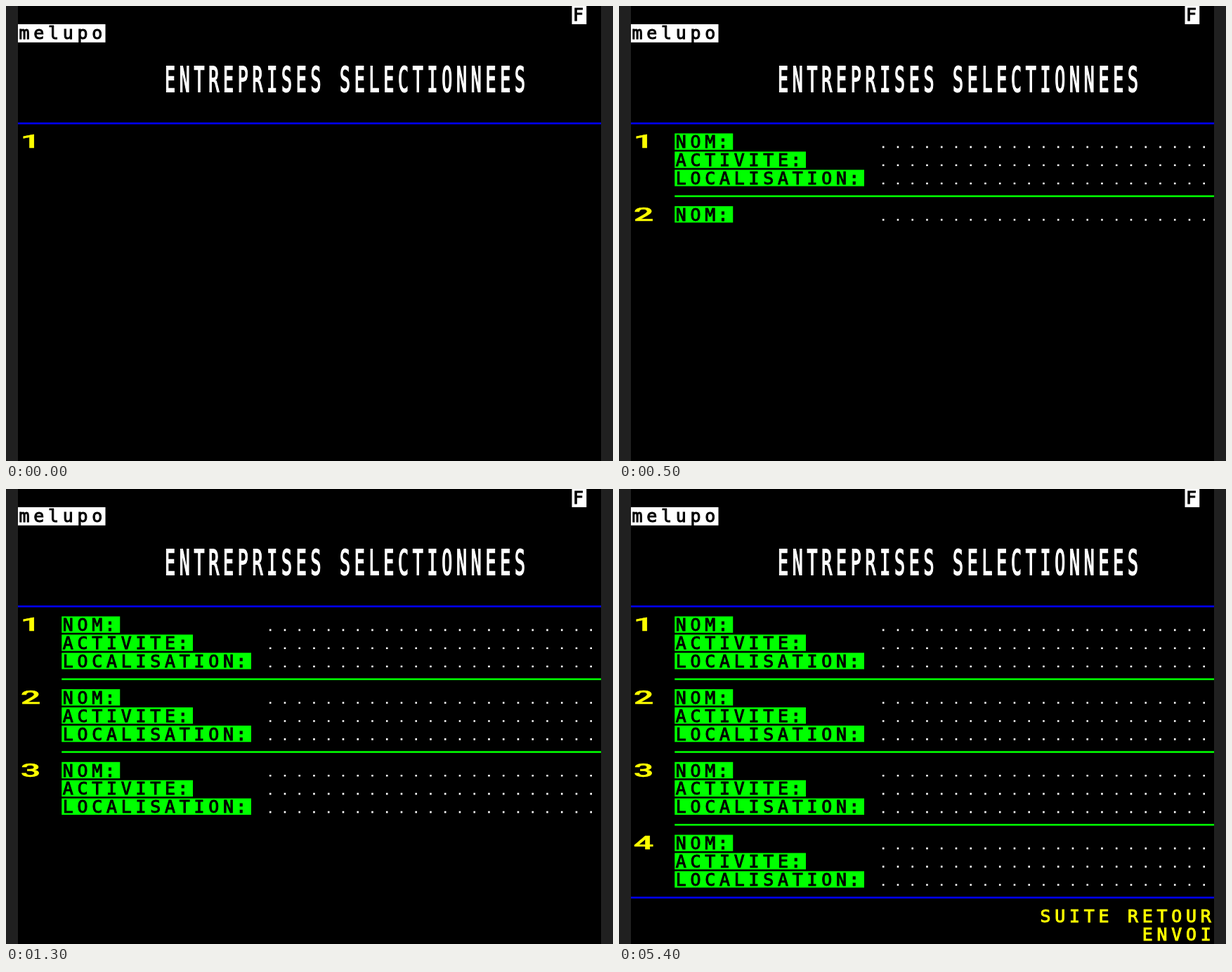
Write an HTML page that moves like this. It is 864 px wide and 648 px high and loops after 8000 ms.

```html
<!DOCTYPE html>
<html lang="fr">
<head>
<meta charset="utf-8">
<title>Entreprises sélectionnées</title>
<style>
  html, body { margin: 0; width: 100%; height: 100%; overflow: hidden; background: #000; }
  svg { display: block; width: 864px; height: 648px; }
  text {
    font: 24.9px "DejaVu Sans Mono", monospace;
    letter-spacing: calc(20.75px - .602em);
    white-space: pre;
    stroke-width: 1;
    stroke-linejoin: miter;
  }
  .digit { font: 500 25.2px Roboto, sans-serif; letter-spacing: 0; text-anchor: middle; stroke-width: .4; }
  .step1 { animation: show1 8s step-end infinite; }
  .step2 { animation: show2 8s step-end infinite; }
  .step3 { animation: show3 8s step-end infinite; }
  @keyframes show1 { 0% { visibility: hidden; } 6.25%, 100% { visibility: visible; } }
  @keyframes show2 { 0% { visibility: hidden; } 12.5%, 100% { visibility: visible; } }
  @keyframes show3 { 0% { visibility: hidden; } 18.75%, 100% { visibility: visible; } }
</style>
</head>
<body>
<svg id="screen" viewBox="0 0 864 648"></svg>
<script>
// Videotex page: 40 x 25 cells, each 8 x 10 dots
const CELL_W = 20.75, CELL_H = 25.92, DOT = 2.592, LEFT = 17, RIGHT = 847;
const YELLOW = '#ff0', GREEN = '#0f0', BLUE = '#00f', WHITE = '#fff', BLACK = '#000';
const colX = col => LEFT + col * CELL_W;
const rowY = row => row * CELL_H;
const textX = col => colX(col) + 1.6;
const baseY = row => rowY(row) + 8 * DOT;

const box = (x, y, w, h, fill) =>
  `<rect x="${x}" y="${y}" width="${w}" height="${h}" fill="${fill}"/>`;

const text = (str, x, y, color, scale = '1 1', kind = 'line') =>
  `<text class="${kind}" transform="translate(${x} ${y}) scale(${scale})"
    fill="${color}" stroke="${color}">${str}</text>`;

const write = (col, row, str, color) => text(str, textX(col), baseY(row), color);
const tall = (col, y, str) => text(str, textX(col), y, WHITE, '1 2');
const number = (n, row) => text(n, 35, baseY(row), YELLOW, '2 1', 'digit');

const inverse = (col, row, str, dots, fill) =>
  box(colX(col), rowY(row), str.length * CELL_W, dots * DOT, fill) +
  write(col, row, str.replace(':', '<tspan dx="-2.5">:</tspan>'), BLACK);

const rule = (col, row, fill) =>
  box(colX(col), rowY(row) + 4 * DOT, RIGHT - colX(col), DOT, fill);

const field = (row, label) => {
  const x = colX(17) + 2 * DOT, y = baseY(row) - DOT / 2;
  return inverse(3, row, label, 9, GREEN) +
    `<path d="M${x} ${y}H${RIGHT}" stroke="${WHITE}" stroke-width="${DOT}"
      stroke-dasharray="${DOT} ${CELL_W - DOT}"/>`;
};

const step = (n, ...parts) => `<g class="step${n}">${parts.join('')}</g>`;

const head = (n, row) => number(n, row) + field(row, 'NOM:');
const rest = row => field(row + 1, 'ACTIVITE:') + field(row + 2, 'LOCALISATION:');

document.getElementById('screen').innerHTML = [
  box(0, 0, LEFT, 648, '#202020'),
  box(RIGHT, 0, LEFT, 648, '#202020'),
  inverse(38, 0, 'F', 10, WHITE),
  inverse(0, 1, 'melupo', 10, WHITE),
  tall(10, 122, 'ENTREPRISES SELECTIONNEES'),
  rule(0, 6, BLUE),
  number(1, 7),
  step(1, field(7, 'NOM:'), rest(7), rule(3, 10, GREEN), head(2, 11)),
  step(2, rest(11), rule(3, 14, GREEN), head(3, 15), rest(15)),
  step(3, rule(3, 18, GREEN), head(4, 19), rest(19), rule(0, 22, BLUE),
    write(28, 23, 'SUITE RETOUR', YELLOW), write(35, 24, 'ENVOI', YELLOW)),
].join('');
</script>
</body>
</html>
```
